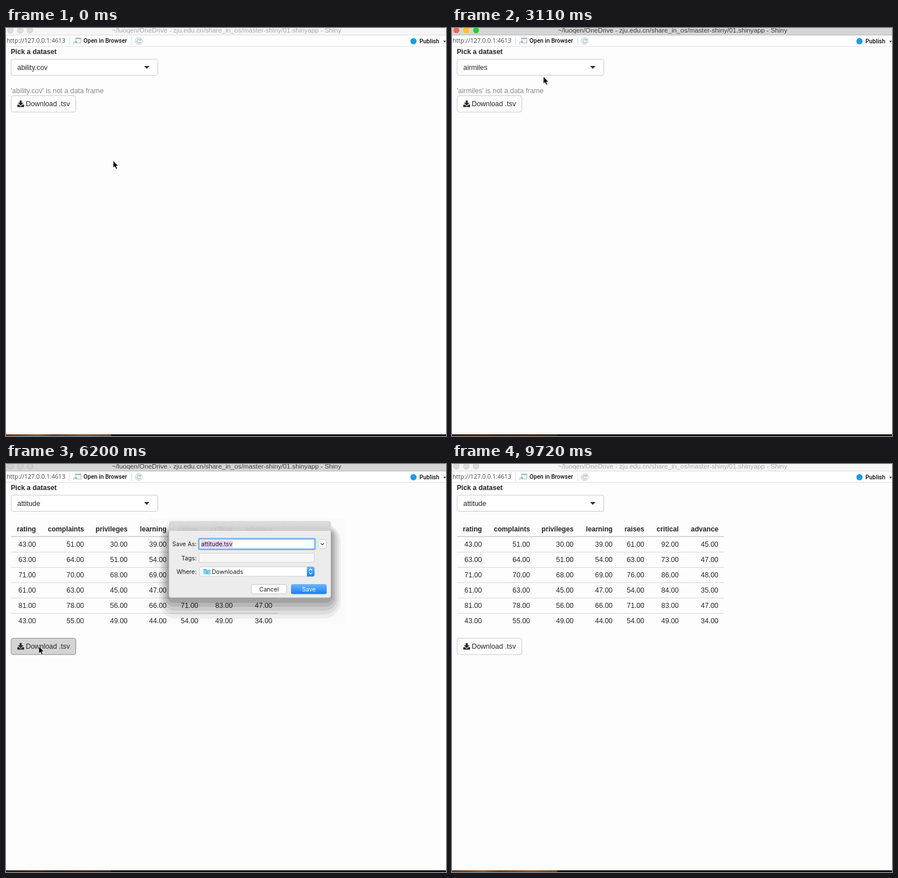
An HTML page for the animation above (9.82 s loop, 778 by 720 pixels).

```html
<!DOCTYPE html>
<html lang="en">
<head>
<meta charset="utf-8">
<title>Dataset picker</title>
<style>
html, body { margin: 0; width: 100%; height: 100%; overflow: hidden; background: #fdfdfd; }
svg { display: block; width: 778px; height: 720px; }
text { font-family: "Liberation Sans", Arial, sans-serif; font-size: 12.4px; fill: #262626; white-space: pre; }
.b { font-weight: bold; font-size: 12.15px; }
.end { text-anchor: end; }
.mid { text-anchor: middle; }
.title { font-size: 11.73px; }
.url { font-family: "Open Sans", sans-serif; font-size: 10.7px; fill: #484848; }
.tool { font-family: Roboto, sans-serif; font-weight: 500; font-size: 10.5px; fill: #111; }
#sheet text { font-family: Inter, sans-serif; font-size: 10.5px; fill: #1c1c1c; }
</style>
</head>
<body>
<svg viewBox="0 0 778 720" xmlns="http://www.w3.org/2000/svg">
  <defs>
    <linearGradient id="blue" x2="0" y2="1"><stop stop-color="#6fb6fa"/><stop offset="1" stop-color="#157ffb"/></linearGradient>
    <linearGradient id="lip" x2="0" y2="1"><stop stop-color="#d9d9d9"/><stop offset="1" stop-color="#cfcfcf"/></linearGradient>
    <linearGradient id="ember">
      <stop stop-color="#6b3510"/><stop offset=".3" stop-color="#a0561a"/><stop offset=".45" stop-color="#6e3a12"/>
      <stop offset=".75" stop-color="#94501c"/><stop offset="1" stop-color="#7a4317"/>
    </linearGradient>
    <clipPath id="listClip"><rect x="9" y="86" width="259" height="174"/></clipPath>
  </defs>
  <rect width="778" height="720" fill="#fdfdfd"/>

  <rect id="bar" width="778" height="12"/>
  <path d="M0 12.5H778" id="barLine"/>
  <g id="lights"><circle cx="7.8" cy="4" r="5.2"/><circle cx="25.2" cy="4" r="5.2"/><circle cx="42.5" cy="4" r="5.2"/></g>
  <text id="title" class="title mid" x="390" y="8">~/luoqen/OneDrive - zju.edu.cn/share_in_os/master-shiny/01.shinyapp - Shiny</text>

  <rect y="13" width="778" height="19" fill="#fff"/>
  <path d="M0 32.5H778" stroke="#e0e2e3"/>
  <path d="M112.5 15V30M222.5 15V30" stroke="#d4d8da"/>
  <text class="url" x="1" y="26">http://127.0.0.1:4613</text>
  <g stroke="#a9bdc9" fill="#eef5f9">
    <rect x="123" y="17.5" width="9.5" height="9"/>
    <path d="M123 18.5H132.5" stroke="#93b4c7" stroke-width="1.6"/>
    <path d="M120 28.5V24.5H125M123 22.5L125.5 24.5L123 26.5" fill="none" stroke="#97a6af"/>
  </g>
  <text class="tool" x="137" y="26">Open in Browser</text>
  <g fill="none" stroke="#b9c5cb">
    <circle cx="234.7" cy="23" r="6.2" fill="#f6f9fa"/>
    <path d="M237.5 21A3.4 3.4 0 1 0 238 24.3M238.2 18.7V21.7H235.2" stroke="#a9b7be" stroke-width="1.2"/>
  </g>
  <circle cx="720.5" cy="23.3" r="5.5" fill="#1c9be6"/>
  <text class="tool" x="731" y="26.5">Publish</text>
  <path d="M773 22.5H778L775.5 25.5Z" fill="#333"/>

  <text class="b" x="8.5" y="46">Pick a dataset</text>
  <rect id="box" x="9" y="55" width="259.5" height="28.5" rx="3.5" fill="#fff"/>
  <text id="value" x="20" y="74"></text>
  <path id="caret" d="M.5 63V76" stroke="#222"/>
  <path id="tri" fill="#2f2f2f"/>

  <text id="note" x="8.5" y="114.6" style="fill:#8a8a8a"></text>
  <g id="table"></g>
  <g id="button">
    <rect id="face" x="9" y="119.5" width="114.5" height="28.8" rx="3.5"/>
    <path d="M24.2 128H27.8V132H31L26 137L21 132H24.2ZM20 135.3H22.8L26 138.2L29.2 135.3H32V139.6H20Z" fill="#2b2b2b"/>
    <text x="35" y="138">Download .tsv</text>
  </g>

  <g id="list">
    <rect x="7" y="90" width="263" height="176" rx="5" fill="#000" opacity=".05"/>
    <rect x="8" y="88" width="261.5" height="176.5" rx="4.5" fill="#000" opacity=".1"/>
    <rect x="8.5" y="86" width="260" height="176" rx="3.5" fill="#fff" stroke="#c9c9c9"/>
    <g id="options" clip-path="url(#listClip)"><rect id="hover" x="9" width="259" height="22.5" fill="#f3f3f3"/></g>
  </g>

  <g id="sheet">
    <g id="shade"></g>
    <path d="M288 118V105Q288 100.5 293 100.5H570Q574.5 100.5 574.5 105V118Z" fill="url(#lip)" opacity=".93"/>
    <path d="M288 118H574.5V232Q574.5 236 570.5 236H292Q288 236 288 232Z" fill="#ececec"/>
    <path d="M288 118V232Q288 236 292 236H570.5Q574.5 236 574.5 232V118" fill="none" stroke="#b4b4b4" stroke-width=".7"/>
    <text class="end" x="337" y="145">Save As:</text>
    <text class="end" x="337" y="170">Tags:</text>
    <text class="end" x="337" y="194">Where:</text>
    <rect x="341" y="132" width="205.5" height="18.5" rx="1.5" fill="#fff" stroke="#80b3ec" stroke-width="2.8"/>
    <rect x="344.5" y="135" width="56.5" height="13" fill="#e6d3f3"/>
    <text x="345" y="145">attitude.tsv</text>
    <rect x="552.5" y="133.5" width="14" height="15.5" rx="3" fill="#fff" stroke="#c8c8c8"/>
    <path d="M556.5 139.7L559.5 142.7L562.5 139.7" fill="none" stroke="#444" stroke-width="1.3"/>
    <rect x="341.5" y="157.5" width="203.5" height="16" fill="#f7f7f7" stroke="#d2d2d2"/>
    <rect x="342" y="181.5" width="203" height="16.5" rx="3" fill="#fff" stroke="#cfcfcf"/>
    <path d="M532 181H542Q545.5 181 545.5 184.5V195Q545.5 198.5 542 198.5H532Z" fill="url(#blue)"/>
    <path d="M536 188L538.7 185.2L541.4 188M536 191.7L538.7 194.5L541.4 191.7" fill="none" stroke="#fff" stroke-width="1.2"/>
    <path d="M349 185H354L355 186.5H361.5V195H349Z" fill="#6cc3ee"/>
    <path d="M349 188H361.5V195H349Z" fill="#86d2f5"/>
    <path d="M355.3 189V193M353.5 191.5L355.3 193.3L357.1 191.5" fill="none" stroke="#3d9fd0"/>
    <text x="364" y="193.5">Downloads</text>
    <rect x="434" y="212.5" width="62" height="16.5" rx="3" fill="#fff" stroke="#c6c6c6"/>
    <text class="mid" x="465" y="224.7">Cancel</text>
    <rect x="504" y="212" width="63" height="17.5" rx="3" fill="url(#blue)"/>
    <text class="mid" x="535.5" y="224.7" style="fill:#fff">Save</text>
  </g>

  <rect y="717" width="778" height="3" fill="#17120f"/>
  <rect id="glow" y="717" width="186" height="3" fill="url(#ember)"/>

  <g id="cursor">
    <path id="arrow" d="M-.5 -1.5V11.5L2.4 8.8L4.5 13.5L6.8 12.5L4.8 8H8.6Z" fill="#000" stroke="#fff" stroke-width=".8"/>
    <path id="beam" d="M-2.5 -6.5Q0 -6.5 0 -4.5Q0 -6.5 2.5 -6.5M0 -4.5V4.5M-2.5 6.5Q0 6.5 0 4.5Q0 6.5 2.5 6.5M-1.5 2.5H1.5" fill="none" stroke="#111" stroke-width="1.1" stroke-linecap="round"/>
    <path id="hand" d="M-1.5 8V1Q-1.5 -.5 -.2 -.5Q1.1 -.5 1.1 1V5Q1.5 3.9 2.6 4.2Q3.6 4.3 3.7 5.3Q5 4.4 5.9 6Q7.8 5.5 7.8 7.8V10Q7.8 12 6.7 13.2V15H.3V13.5Q-1.5 11.6 -3.9 8.8Q-4.7 7.3 -3.4 6.8Q-2.5 6.7 -1.5 8ZM2 9V12.5M4 9V12.5M6 9V12.5" fill="#fff" stroke="#111"/>
  </g>
</svg>
<script>
const LOOP = 9820;
const $ = id => document.getElementById(id);
const show = (id, on) => $(id).setAttribute('display', on ? 'inline' : 'none');
const set = (id, attrs) => { for (const k in attrs) $(id).setAttribute(k, attrs[k]); };

function add(parent, tag, attrs, text) {
  const el = document.createElementNS('http://www.w3.org/2000/svg', tag);
  for (const k in attrs) el.setAttribute(k, attrs[k]);
  if (text !== undefined) el.textContent = text;
  return parent.appendChild(el);
}

const names = ['ability.cov', 'airmiles', 'AirPassengers', 'airquality', 'anscombe', 'attenu', 'attitude', 'austres'];
const ROW = 22.55, TOP = 91.3;
names.forEach((n, i) => add($('options'), 'text', { x: 20, y: 107 + i * ROW }, n));

const heads = 'rating complaints privileges learning raises critical advance'.split(' ');
const edges = [53, 138, 215, 284, 340, 401, 471];
const data = [
  '43 51 30 39 61 92 45', '63 64 51 54 63 73 47', '71 70 68 69 76 86 48',
  '61 63 45 47 54 84 35', '81 78 56 66 71 83 47', '43 55 49 44 54 49 34'
];
heads.forEach((h, i) => add($('table'), 'text', { x: edges[i], y: 119, class: 'b end' }, h));
data.forEach((row, r) => {
  const y = 128 + r * 27;
  add($('table'), 'path', { d: `M9 ${r ? y + .5 : y}H481`, stroke: '#d6d6d6', 'stroke-width': r ? 1 : 1.8 });
  row.split(' ').forEach((v, i) => add($('table'), 'text', { x: edges[i], y: y + 18, class: 'end' }, v + '.00'));
});

// stacked bands below the sheet
add($('shade'), 'rect', { x: 252, y: 96, width: 347, height: 186, fill: '#000', opacity: .012 });
for (let i = 0; i < 5; i++) {
  const m = 17.5 - i * 3.6, top = 119 - m * .8;
  add($('shade'), 'rect', {
    x: 288 - m, y: top, width: 286.5 + 2 * m, height: 273 - i * 7 - top,
    rx: 8 + m * 1.3, fill: '#000', opacity: .05 + i * .016
  });
}

// cursor legs: start, end, steps, x, y
const legs = [
  [150, 890, 6, 136, 110], [1190, 1490, 3, 184, 77], [1780, 1780, 1, 180, 71],
  [1930, 2370, 4, 165, 126], [3110, 3110, 1, 162, 87], [3257, 3404, 2, 160, 73],
  [3699, 4140, 4, 105, 178], [4280, 4730, 4, 72, 244], [5170, 5610, 4, 58.5, 323],
  [6346, 6940, 5, 535, 211], [7090, 7540, 4, 536, 223], [8130, 8280, 2, 708, 613],
  [8580, 8580, 1, 728, 684], [8880, 9030, 2, 750, 722]
];

function pointer(t) {
  let x = 190, y = 235.5;
  for (const [start, end, n, tx, ty] of legs) {
    if (t < start) break;
    const gap = (end - start) / (n - 1 || 1) || 1;
    const p = Math.min(n, Math.floor((t - start) / gap + 1e-6) + 1) / n;
    x += (tx - x) * p;
    y += (ty - y) * p;
  }
  return [x, y];
}

const within = (t, a, b) => t >= a && t < b;

function render(t) {
  const [x, y] = pointer(t);
  const active = within(t, 1780, 9720);
  const sheet = within(t, 5900, 7990);
  const open = within(t, 1930, 2670) || within(t, 3551, 4880);
  const tabled = t >= 4880;
  const pick = t < 2670 ? 0 : tabled ? 6 : 1;

  set('bar', { fill: active ? '#d5d5d5' : '#f6f6f6' });
  set('barLine', { stroke: active ? '#b8b8b8' : '#dcdcdc' });
  $('title').style.fill = active ? '#404040' : '#a8a8a8';
  const lit = active && !sheet;
  [...$('lights').children].forEach((c, i) => {
    c.setAttribute('fill', lit ? ['#fc605b', '#fdbf2f', '#2ac840'][i] : sheet ? '#cfcfcf' : '#dcdcdc');
    c.setAttribute('stroke', lit ? 'none' : sheet ? '#bdbdbd' : '#d0d0d0');
  });
  set('glow', { opacity: active ? .3 : 1 });

  $('value').textContent = names[pick];
  set('box', { stroke: open ? '#3f9fe0' : '#c8c8c8', 'stroke-width': open ? 1.4 : 1 });
  set('tri', { d: open ? 'M244.5 71H253.5L249 66.5Z' : 'M244 67H253.8L248.9 72Z' });
  show('caret', open);
  if (open) set('caret', { transform: `translate(${Math.round(20 + $('value').getComputedTextLength())})` });

  show('list', open);
  const row = y > TOP ? Math.floor((y - TOP) / ROW) : pick;
  set('hover', { y: TOP + row * ROW });

  show('note', !tabled);
  $('note').textContent = `'${names[pick]}' is not a data frame`;
  show('table', tabled);
  set('button', { transform: `translate(0 ${tabled ? 188 : 0})` });
  const over = tabled && y > 307 && y < 337 && x < 124;
  const focus = within(t, 5610, 9720);
  set('face', {
    fill: focus && over ? '#d4d4d4' : focus || over ? '#e6e6e6' : '#fff',
    stroke: focus ? '#8c8c8c' : over ? '#adadad' : '#c8c8c8'
  });
  show('sheet', sheet);

  const inBox = x > 9 && x < 268 && y > 54 && y < 84;
  const hand = (open && y > 86) || (over && !focus) || within(t, 7990, 8130);
  set('cursor', { transform: `translate(${x} ${y})` });
  show('hand', hand);
  show('beam', inBox && !hand);
  show('arrow', !inBox && !hand);
}

function tick() {
  render(performance.now() % LOOP);
  requestAnimationFrame(tick);
}
tick();
</script>
</body>
</html>
```
